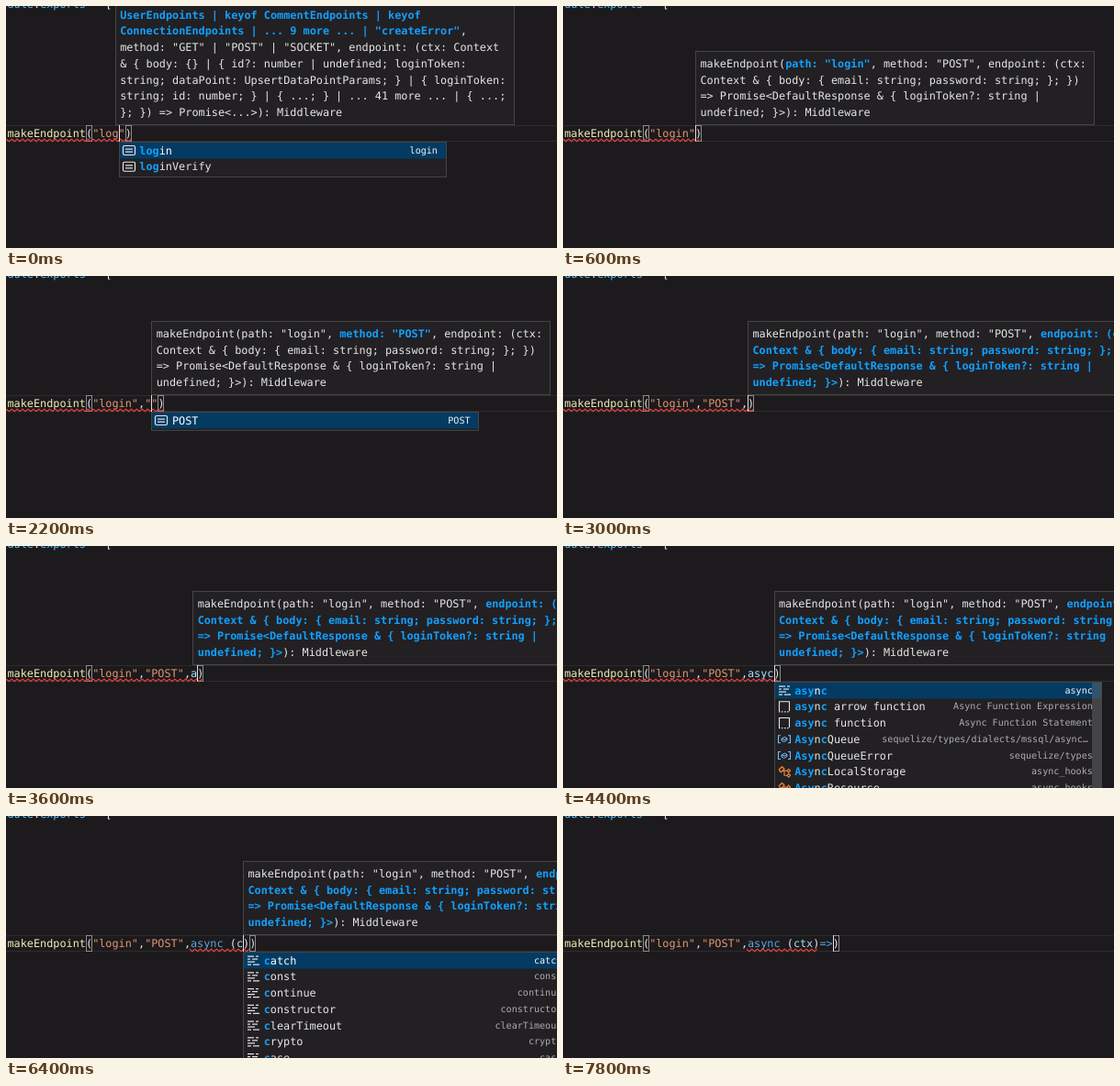
These frames come from a looping animation (600x264 px, 8000 ms). An HTML page with a canvas:

```html
<!DOCTYPE html>
<html lang="en">
<head>
<meta charset="utf-8">
<title>Typed endpoint autocompletion</title>
<style>
html, body { margin: 0; width: 100%; height: 100%; overflow: hidden; background: #1c1a1c; }
canvas { display: block; width: 600px; height: 264px; }
</style>
</head>
<body>
<canvas id="stage" width="600" height="264"></canvas>
<script>
const ctx = document.getElementById('stage').getContext('2d');
const LOOP = 8000;
const CELL = 7.125;         // advance of one code character
const LEFT = 1.5;
const LINE = 17.75;
const CALL = 'makeEndpoint(';
const MONO = '"DejaVu Sans Mono", monospace';
const CODE = '11.835px ' + MONO;
const BOLD = 'bold ' + CODE;
const SMALL = '10.08px ' + MONO;

const C = {
  bg: '#1c1a1c', panel: '#222023', edge: '#454545', line: '#2d2b2d',
  text: '#e6e6e6', fn: '#eeecb4', string: '#e29573', name: '#a4e0ff',
  keyword: '#55a6e0', match: '#12a0ff', selected: '#043b63', detail: '#adadad',
  error: '#f84444', blue: '#75beff', orange: '#e8853a', bracket: '#8c8c8c',
  scroll: 'rgba(121, 121, 121, 0.4)'
};

// '*' switches the highlighted parameter on and off.
const UNION = `*UserEndpoints | keyof CommentEndpoints | keyof
ConnectionEndpoints | ... 9 more ... | "createError"*,
method: "GET" | "POST" | "SOCKET", endpoint: (ctx: Context
& { body: {} | { id?: number | undefined; loginToken:
string; dataPoint: UpsertDataPointParams; } | { loginToken:
string; id: number; } | { ...; } | ... 41 more ... | { ...;
}; }) => Promise<...>): Middleware`;

const PARAMS = ['path: "login"', 'method: "POST"',
`endpoint: (ctx:
Context & { body: { email: string; password: string; }; })
=> Promise<DefaultResponse & { loginToken?: string |
undefined; }>`];

const signature = active =>
  CALL + PARAMS.map((p, i) => i === active ? `*${p}*` : p).join(', ') + '): Middleware';

const PATHS = [['value', 'login', 'login'], ['value', 'loginVerify']];
const METHODS = [['value', 'POST', 'POST']];
const ASYNC = [
  ['keyword', 'async', 'async'],
  ['snippet', 'async arrow function', 'Async Function Expression'],
  ['snippet', 'async function', 'Async Function Statement'],
  ['variable', 'AsyncQueue', 'sequelize/types/dialects/mssql/async…', 5],
  ['variable', 'AsyncQueueError', 'sequelize/types'],
  ['class', 'AsyncLocalStorage', 'async_hooks'],
  ['class', 'AsyncResource', 'async_hooks']
];
const WORDS = ['catch', 'const', 'continue', 'constructor', 'clearTimeout', 'crypto', 'case', 'class']
  .map(w => ['keyword', w, w]);

// Each step: time, text before caret, text after it, parameter shown, extras.
const L = '"login"', P = L + ',"POST"', A = P + ',async';
const STEPS = [
  [0, '"log', '"', 0, { union: true, list: PATHS, query: 'log', shift: -4 }],
  [200, '"login', '"', 0],
  [400, L, '', 0],
  [1000, L + ',', '', 1],
  [1600, L + ',"', '"', 1],
  [1800, L + ',"', '"', 1, { list: METHODS, query: '' }],
  [2400, L + ',"POST', '"', 1],
  [2600, P, '', 1],
  [3000, P + ',', '', 2],
  [3600, P + ',a', '', 2, { shift: -5 }],
  [3800, P + ',a', '', 2, { list: ASYNC, query: 'a' }],
  [4000, P + ',as', '', 2, { list: ASYNC, query: 'as' }],
  [4200, P + ',asy', '', 2, { list: ASYNC, query: 'asy' }],
  [4400, P + ',asyc', '', 2, { list: ASYNC, query: 'asyc' }],
  [4800, P + ',asy', '', 2, { list: ASYNC, query: 'asy' }],
  [5000, P + ',asyn', '', 2, { list: ASYNC, query: 'asyn' }],
  [5200, A, '', 2, { list: ASYNC, query: 'async' }],
  [5400, A + ' ', '', 2, { error: [28, 33] }],
  [5600, A + ' ', '', 2, { error: [28, 33], noCaret: true }],
  [6000, A + ' ', '', 2, { error: [28, 33] }],
  [6200, A + ' (', ')', 2, { error: [28, 36] }],
  [6400, A + ' (c', ')', 2, { error: [28, 37], list: WORDS, query: 'c' }],
  [6600, A + ' (ct', ')', 2, { error: [28, 38], list: WORDS, query: 'ct' }],
  [6800, A + ' (ctx', ')', 2, { error: [28, 39] }],
  [7000, A + ' (ctx)', '', 2, { error: [28, 39] }],
  [7200, A + ' (ctx)', '', -1, { error: [28, 39] }],
  [7400, A + ' (ctx)=', '', -1, { error: [28, 39] }],
  [7600, A + ' (ctx)=>', '', -1, { error: [28, 39] }]
];

const colX = col => LEFT + col * CELL;

function rect(x, y, w, h, color) {
  ctx.fillStyle = color;
  ctx.fillRect(x, y, w, h);
}

function outline(x, y, w, h, color) {
  ctx.strokeStyle = color;
  ctx.lineWidth = 1;
  ctx.strokeRect(Math.round(x) + 0.5, Math.round(y) + 0.5, Math.round(w) - 1, Math.round(h) - 1);
}

function text(s, x, y, color, font = CODE) {
  ctx.font = font;
  ctx.fillStyle = color;
  ctx.fillText(s, x, y);
}

function stroke(points, color, width = 1) {
  ctx.beginPath();
  points.forEach(([x, y]) => ctx.lineTo(x, y));
  ctx.strokeStyle = color;
  ctx.lineWidth = width;
  ctx.stroke();
}

function squiggle(from, to) {
  const points = [];
  for (let x = from - 1.2, up = 1; x <= to; x += 2.96, up ^= 1) points.push([x, up ? 145.2 : 147.7]);
  stroke(points, C.error, 1.1);
}

function tokenColor(token, rest) {
  if (token[0] === '"') return C.string;
  if (token === '=>') return C.keyword;
  if (token === 'async') return rest.startsWith(' (') ? C.keyword : C.name;
  return /^\w/.test(token) ? C.name : C.text;
}

function drawCode(before, after, { error, noCaret }) {
  const args = before + after;
  const caret = colX(CALL.length + before.length);
  const close = CALL.length + args.length;

  rect(0, 130, 600, 1, C.line);
  rect(0, 147, 600, 1, C.line);
  text('module', colX(-2), 2, '#4fc1ff');
  text('.', colX(4), 2, C.text);
  text('exports', colX(5), 2, '#4fc1ff');
  text('= [', colX(13), 2, C.text);

  text('makeEndpoint', LEFT, 143, C.fn);
  text('(', colX(12), 143, C.text);
  for (const m of args.matchAll(/"[^"]*"?|\w+|=>|[^\w"]/g)) {
    const rest = args.slice(m.index + m[0].length);
    text(m[0], colX(CALL.length + m.index), 143, tokenColor(m[0], rest));
  }
  text(')', colX(close), 143, C.text);
  outline(colX(12), 130, 7, 18, C.bracket);
  outline(colX(close), 130, 7, 18, C.bracket);

  const [from, to] = error || [0, close + 1];
  squiggle(colX(from), colX(to));
  if (!noCaret) rect(Math.round(caret), 130, 1, 18, '#e0e0e0');
  return caret;
}

function drawTip(source, x) {
  const lines = source.split('\n');
  const top = Math.round(120 - lines.length * LINE);
  const left = Math.round(x);
  rect(left, top, 435, 130 - top, C.panel);
  outline(left, top, 435, 130 - top, C.edge);
  let bold = false;
  lines.forEach((line, i) => {
    let col = 0;
    const y = 120 - (lines.length - 1 - i) * LINE;
    line.split('*').forEach((part, k) => {
      if (k) bold = !bold;
      text(part, x + 5.5 + col * CELL, y, bold ? C.match : C.text, bold ? BOLD : CODE);
      col += part.length;
    });
  });
}

// Icons are drawn around (0, 0).
const ICONS = {
  value() {
    ctx.strokeStyle = C.text;
    ctx.lineWidth = 1.2;
    ctx.beginPath();
    ctx.roundRect(-6.5, -5, 13, 10, 1.5);
    ctx.stroke();
    rect(-4, -2, 8, 1.2, C.text);
    rect(-4, 1, 8, 1.2, C.text);
  },
  keyword() {
    [[-6, -5, 7], [3, -5, 3], [-6, -2, 3], [-1, -2, 6], [-6, 1, 8], [-6, 4, 4], [0, 4, 7]]
      .forEach(([x, y, w]) => rect(x, y, w, 1.2, C.text));
  },
  snippet() {
    stroke([[-5.5, 5], [-5.5, -5.5], [5.5, -5.5], [5.5, 5]], C.text, 1.1);
    for (let x = -6; x < 6; x += 3) rect(x, 5, 1.5, 1.2, C.text);
  },
  variable() {
    for (const s of [-1, 1]) stroke([[s * 4, -4], [s * 6.5, -4], [s * 6.5, 4], [s * 4, 4]], C.blue, 1.1);
    stroke([[-3, -0.5], [0.5, -2.5], [3, -1], [3, 1], [-0.5, 3], [-3, 1.5], [-3, -0.5], [0, 0.7], [3, -1]], C.blue);
  },
  class() {
    stroke([[-6, -2], [-2.5, -5.5], [0, -3], [-3.5, 0.5], [-6, -2]], C.orange, 1.3);
    stroke([[-2, -1], [4, -1]], C.orange, 1.2);
    stroke([[0, -1], [0, 4], [3, 4]], C.orange, 1.2);
    for (const y of [-1, 4]) stroke([[3, y], [4.8, y - 1.8], [6.5, y], [4.8, y + 1.8], [3, y]], C.orange, 1.2);
  }
};

// Positions of the query's letters in a label, or null when it does not match.
function fuzzy(label, query) {
  const hits = [];
  let at = -1;
  for (const ch of query) {
    at = label.toLowerCase().indexOf(ch, at + 1);
    if (at < 0) return null;
    hits.push(at);
  }
  return hits;
}

function drawList(items, query, caret) {
  const rows = items.filter(item => fuzzy(item[1], query));
  const width = 357;
  const height = Math.round(rows.length * LINE + 3.5);
  const x = Math.round(caret);
  rect(x, 148, width, height, C.panel);
  rect(x + 1, 149, width - 2, 17.5, C.selected);
  outline(x, 148, width, height, C.edge);
  rows.forEach(([icon, label, detail, inset = 0], i) => {
    const mid = 157.5 + i * LINE;
    ctx.save();
    ctx.translate(x + 11, mid);
    ICONS[icon]();
    ctx.restore();
    const hits = fuzzy(label, query);
    [...label].forEach((ch, k) => {
      const hit = hits.includes(k);
      const plain = i ? C.text : '#fff';
      text(ch, caret + 22.7 + k * CELL, mid + 4, hit ? C.match : plain, hit ? BOLD : CODE);
    });
    if (detail) {
      ctx.textAlign = 'right';
      text(detail, caret + 347.3 - inset, mid + 3.2, i ? C.detail : '#f4f4f4', SMALL);
      ctx.textAlign = 'left';
    }
  });
  if (148 + height > 264) rect(x + width - 11, 149, 10, height - 2, C.scroll);
}

function draw(time) {
  const [, before, after, active, extra = {}] = STEPS.findLast(step => step[0] <= time);
  rect(0, 0, 600, 264, C.bg);
  const caret = drawCode(before, after, extra);
  if (active >= 0) drawTip(extra.union ? UNION : signature(active), caret + (extra.shift || 0));
  if (extra.list) drawList(extra.list, extra.query, caret);
}

ctx.textRendering = 'geometricPrecision';
const start = performance.now();
function tick() {
  draw((performance.now() - start) % LOOP);
  requestAnimationFrame(tick);
}
tick();
</script>
</body>
</html>
```
